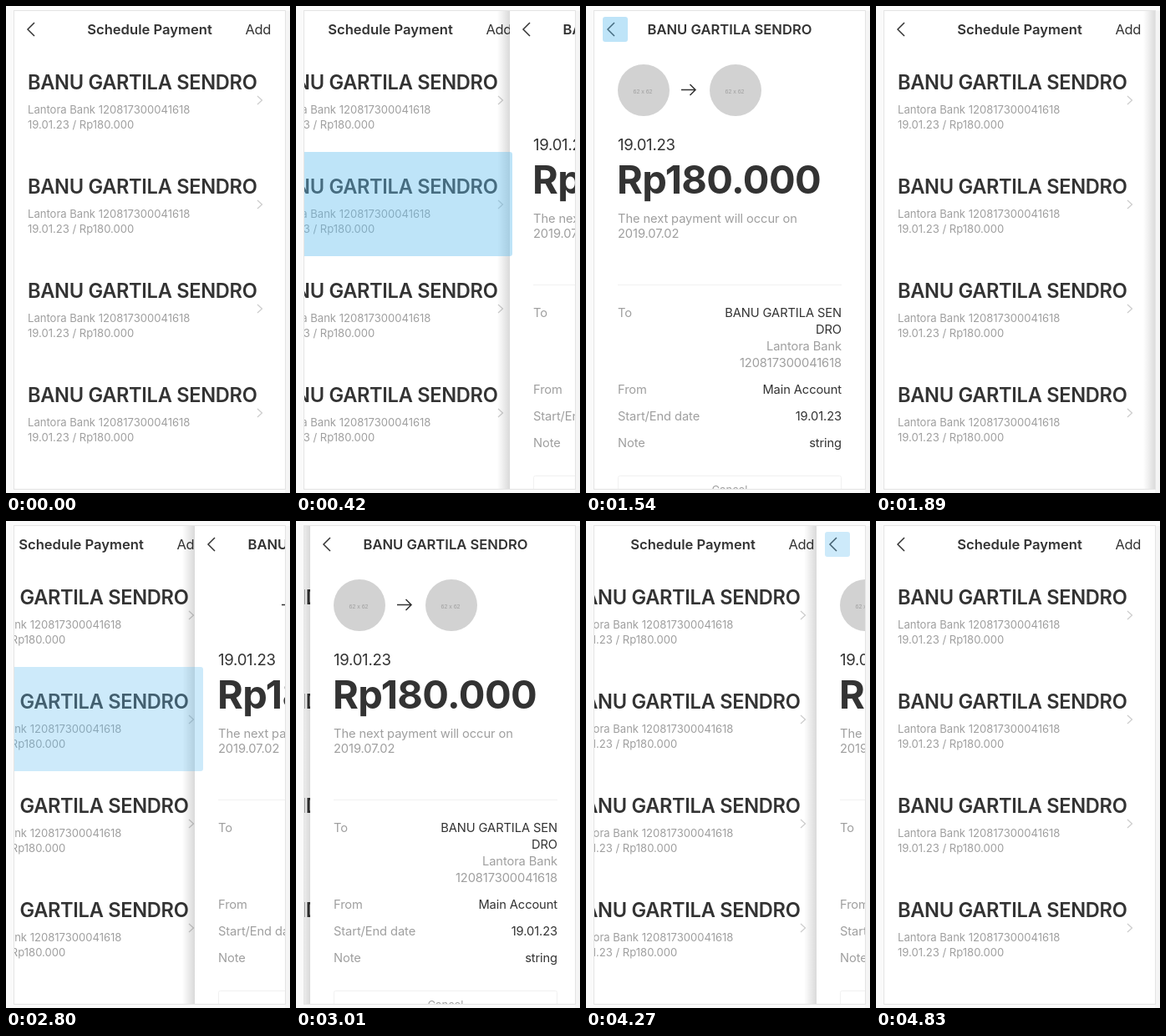
Write an HTML page that moves like this. It is 340 by 584 pixels and loops after 4970 ms.

```html
<!DOCTYPE html>
<html lang="en">
<head>
<meta charset="utf-8">
<title>Schedule Payment</title>
<style>
  html, body { margin: 0; width: 100%; height: 100%; overflow: hidden; background: #fafafa; }
  svg { display: block; width: 340px; height: 584px; }
  text { font-family: Inter, "Liberation Sans", sans-serif; font-optical-sizing: none; fill: #333; }
  .title { font-size: 16.6px; font-weight: 600; text-anchor: middle; }
  .add { font-size: 16.5px; letter-spacing: -.4px; }
  .name { font-size: 23.6px; font-weight: 600; letter-spacing: -.3px; }
  .sub { font-size: 13.05px; }
  .date { font-size: 18.6px; letter-spacing: -.28px; }
  .sum { font-size: 47px; font-weight: 700; letter-spacing: -.6px; }
  .body { font-size: 14.7px; letter-spacing: -.1px; }
  .end { text-anchor: end; }
  .mid { text-anchor: middle; }
  .tiny { font: 7px "Liberation Sans", sans-serif; text-anchor: middle; }
  .tiny, .sub, .grey { fill: #9f9f9f; }
  .line { fill: none; stroke: #333; stroke-width: 1.5; }
  .thin { fill: none; stroke: #f1f1f1; }
  .next { fill: none; stroke: #ccc; stroke-width: 1.2; }
  .tap { fill: rgb(97, 190, 238); }
</style>
</head>
<body>
<svg viewBox="0 0 340 584">
  <defs>
    <clipPath id="view"><rect x="10" y="6" width="324" height="573"/></clipPath>
    <linearGradient id="fade">
      <stop offset="0" stop-opacity="0"/>
      <stop offset="1" stop-opacity=".15"/>
    </linearGradient>
  </defs>
  <rect width="340" height="584" fill="#fafafa"/>
  <rect x="334" y="6" width="6" height="578" fill="#f5f5f5"/>
  <rect x="9.5" y="5.5" width="325" height="574" fill="#fff" stroke="#e4e4e4"/>
  <g clip-path="url(#view)">
    <g id="list"></g>
    <g id="detail"></g>
    <rect id="rowTap" class="tap" x="10" y="175" width="308" height="125" rx="3"/>
    <rect id="backTap" class="tap" x="20" y="13" width="30" height="30" rx="3"/>
  </g>
</svg>
<script>
const LOOP = 4970, STEP = 70, WIDTH = 325, PARALLAX = 0.75;
const PUSH = 350, POP = 290;
// tap and slide start times; "clear" is when the pop's shadow is removed
const visits = [
  { tap: 350, push: 358, backTap: 1540, pop: 1590, clear: 2030 },
  { tap: 2660, push: 2724, backTap: 4130, pop: 4120, clear: 4550 }
];
const NAME = 'BANU GARTILA SENDRO', BANK = 'Lantora Bank', ACCOUNT = '120817300041618';
const DATE = '19.01.23', SUM = 'Rp180.000';
const $ = id => document.getElementById(id);
const text = (x, y, cls, str) => `<text x="${x}" y="${y}" class="${cls}">${str}</text>`;
const path = (d, cls) => `<path d="${d}" class="${cls}"/>`;
const back = path('M34 20l-8 8 8 8', 'line');

function listRow(i) {
  const y = 125 * i;
  return text(26, 100 + y, 'name', NAME) +
    text(26, 129 + y, 'sub', `${BANK} ${ACCOUNT}`) +
    text(26, 147 + y, 'sub', `${DATE} / ${SUM}`) +
    path(`M301 ${108 + y}l5.5 5-5.5 5`, 'next');
}

function avatar(x) {
  return `<circle cx="${x}" cy="101" r="31" fill="#d2d2d2"/>` + text(x - 1, 104.5, 'tiny', '62 x 62');
}

function field(y, label, value) {
  return text(38, y, 'body grey', label) + text(306, y, 'body end', value);
}

$('list').innerHTML = back + text(172, 34, 'title', 'Schedule Payment') +
  text(286.5, 34, 'add', 'Add') + [0, 1, 2, 3].map(listRow).join('');

$('detail').innerHTML =
  '<rect id="shadow" x="-5" y="6" width="15" height="573" fill="url(#fade)"/>' +
  '<rect x="10" y="6" width="325" height="573" fill="#fff"/>' +
  back + text(172, 34, 'title', NAME) +
  `<g id="avatars">${avatar(69)}${avatar(179)}</g>` +
  path('M114 100.5h16.5M124.5 94l6.5 6.5-6.5 6.5', 'line') +
  text(38, 173, 'date', DATE) + text(37, 225, 'sum', SUM) +
  text(38, 260, 'body grey', 'The next payment will occur on') +
  text(38, 278, 'body grey', '2019.07.02') +
  path('M38 334.5h268', 'thin') +
  field(373, 'To', NAME.slice(0, 16)) +
  text(306, 393, 'body end', NAME.slice(16)) +
  text(306, 413, 'body end grey', BANK) + text(306, 433, 'body end grey', ACCOUNT) +
  field(465, 'From', 'Main Account') + field(497, 'Start/End date', DATE) + field(529, 'Note', 'string') +
  '<rect x="38.5" y="563.5" width="267" height="40" rx="2" class="thin"/>' +
  text(172, 585, 'sub mid', 'Cancel');

// CSS "ease", cubic-bezier(.25, .1, .25, 1), solved by bisection
function ease(x) {
  if (x <= 0) return 0;
  if (x >= 1) return 1;
  const curve = (a, b, u) => 3 * a * u * (1 - u) ** 2 + 3 * b * u * u * (1 - u) + u ** 3;
  let lo = 0, hi = 1;
  for (let i = 0; i < 24; i++) {
    const u = (lo + hi) / 2;
    if (curve(.25, .25, u) < x) lo = u; else hi = u;
  }
  return curve(.1, 1, lo);
}

const glow = age => age < 0 || age > 280 ? 0 : .41 * Math.min(1, (280 - age) / 180);

function draw(t) {
  const v = t < visits[1].tap ? visits[0] : visits[1];
  const open = ease((t - v.push) / PUSH) - ease((t - v.pop) / POP);
  const move = (id, dx) => $(id).setAttribute('transform', `translate(${Math.round(dx)} 0)`);
  const listX = -PARALLAX * WIDTH * open, detailX = WIDTH * (1 - open);
  move('list', listX);
  move('rowTap', listX);
  move('detail', detailX);
  move('backTap', detailX);
  $('rowTap').setAttribute('opacity', glow(t - v.tap));
  $('backTap').setAttribute('opacity', glow(t - v.backTap));
  $('shadow').setAttribute('visibility', t >= v.push && t < v.clear ? 'visible' : 'hidden');
  $('avatars').setAttribute('visibility', t - v.push > 150 ? 'visible' : 'hidden');
}

const start = performance.now();
function tick() {
  const t = (performance.now() - start) % LOOP;
  draw(Math.floor(t / STEP) * STEP);
  requestAnimationFrame(tick);
}
tick();
</script>
</body>
</html>
```
